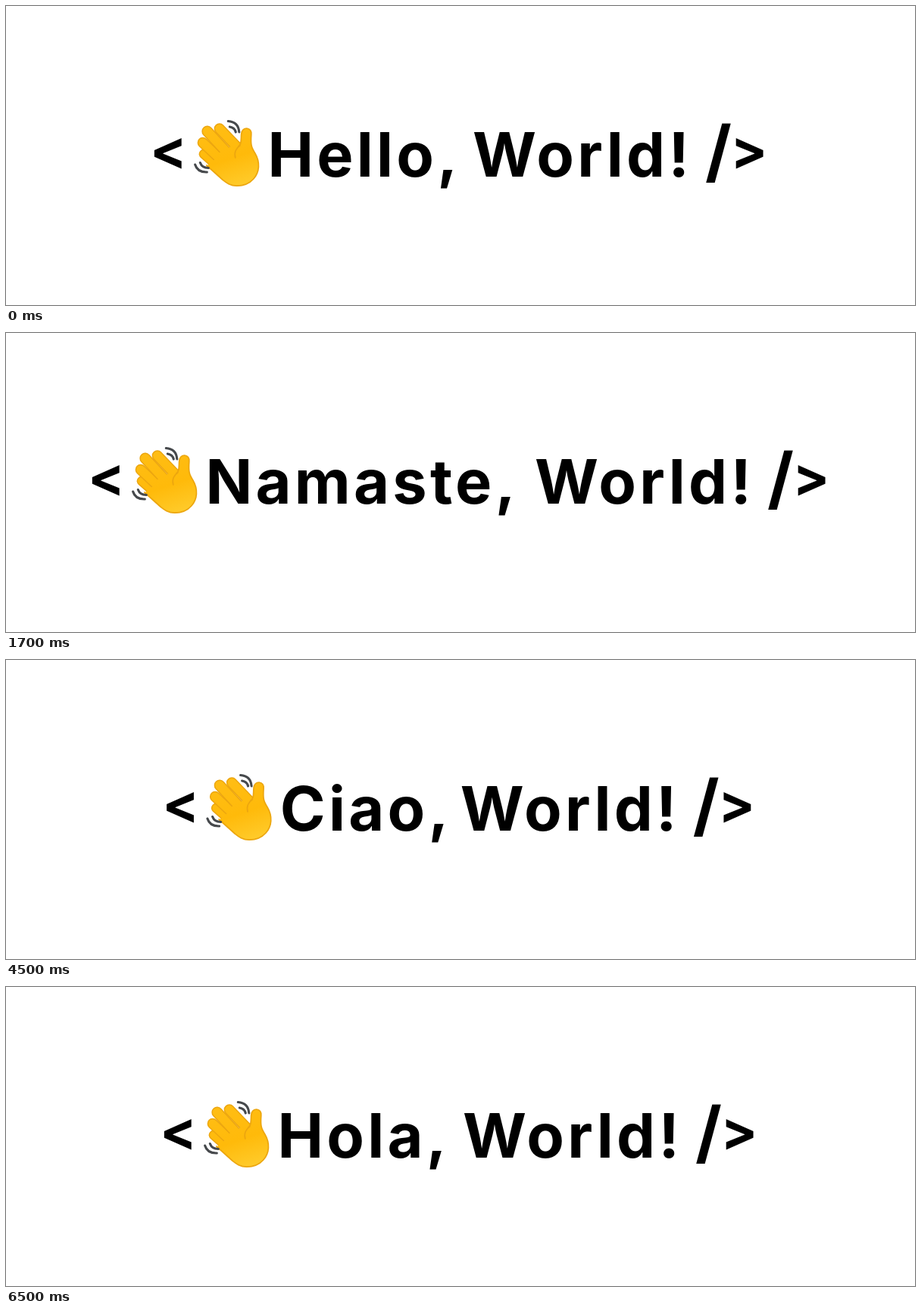
An HTML page that plays this animation: 1200x396 px, repeating every 8000 ms.

```html
<!DOCTYPE html>
<html lang="en">
<head>
<meta charset="utf-8">
<title>Hello, World!</title>
<style>
  html, body { margin: 0; width: 100%; height: 100%; overflow: hidden; background: #fff; }
  svg { display: block; width: 1200px; height: 396px; }
  text { font-family: Inter, "Open Sans", sans-serif; font-weight: 700; font-optical-sizing: none; fill: #000; }
  .word { font-size: 81px; letter-spacing: .053em; }
  .finger, .edge, .wave { fill: none; stroke-linecap: round; stroke-linejoin: round; }
  .edge { stroke: #eca60f; stroke-width: 1.7; }
  .wave { stroke: #46494c; stroke-width: 3.1; }
</style>
</head>
<body>
<svg id="stage" viewBox="0 0 1200 396">
  <defs>
    <linearGradient id="skin" gradientUnits="userSpaceOnUse" x1="30" y1="8" x2="58" y2="90">
      <stop offset="0" stop-color="#ffbd14"/>
      <stop offset=".55" stop-color="#ffba0a"/>
      <stop offset="1" stop-color="#ffcb2b"/>
    </linearGradient>
    <g id="hand">
      <g id="fingers"></g>
      <path fill="url(#skin)" d="M63 19Q64 12 70 12Q76.500 13 76 20C75 34 76 37 81 45C88 57 87 70 79 79C72 87 63 88.500 57 88.500C48 88.500 43 84 38 80L17 62L28 53L34 44L44 40L52 33L59 36C64 33 62 25 63 19Z"/>
      <path class="edge" d="M59 36C64 33 62 25 63 19Q64 12 70 12Q76.500 13 76 20C75 34 76 37 81 45C88 57 87 70 79 79C72 87 63 88.200 57 88.200C48 88.200 43 84 38 80L17 61"/>
      <path class="edge" d="M61 35C56 38 53 44 55 51"/>
      <path class="wave" d="M45.500 2.500Q59 3.500 60 17M47.500 10Q54 11 55.500 17M1.800 60Q5 70.500 17.500 70M8.500 57.500Q11 64.500 19.500 64.500"/>
    </g>
  </defs>
</svg>
<script>
const LOOP = 8000;
// greeting, start, end, left edge of the centred line
const scenes = [
  ["Hello,", 0, 500, 195],
  ["Namaste,", 500, 2500, 113],
  ["Bonjour,", 2500, 4500, 133.5],
  ["Ciao,", 4500, 6500, 211.3],
  ["Hola,", 6500, 8000, 208]
];
// tip x, tip y, base x, base y, width
const fingers = [
  [13, 46, 40, 70, 11],
  [12, 31, 46, 63, 13],
  [18, 16, 52, 53, 13.5],
  [34, 12.5, 66, 46, 13]
];

const pen = document.createElement("canvas").getContext("2d");

function add(parent, tag, attrs, text) {
  const el = document.createElementNS("http://www.w3.org/2000/svg", tag);
  for (const key in attrs) el.setAttribute(key, attrs[key]);
  if (text) el.textContent = text;
  parent.append(el);
  return el;
}

function ink(text, size) {
  pen.font = `700 ${size}px Inter, "Open Sans", sans-serif`;
  return pen.measureText(text);
}

// Puts a sign by the left and the vertical middle of its ink.
function sign(parent, text, left, middle, size) {
  const m = ink(text, size);
  add(parent, "text", {
    x: left + m.actualBoundingBoxLeft,
    y: middle + (m.actualBoundingBoxAscent - m.actualBoundingBoxDescent) / 2,
    "font-size": size
  }, text);
}

function word(parent, text, x) {
  add(parent, "text", { class: "word", x, y: 226 }, text);
}

const fingerBox = document.getElementById("fingers");
for (const [x1, y1, x2, y2, w] of fingers) {
  const d = `M${x1} ${y1}L${x2} ${y2}`;
  add(fingerBox, "path", { class: "finger", d, stroke: "#eca60f", "stroke-width": w + 1.4 });
  add(fingerBox, "path", { class: "finger", d, stroke: "url(#skin)", "stroke-width": w - 1.6 });
}

const stage = document.getElementById("stage");
for (const [greeting, start, end, left] of scenes) {
  const right = 1200 - left;
  const g = add(stage, "g", { opacity: 0 });
  sign(g, "<", left, 195.5, 72);
  add(g, "use", { href: "#hand", x: left + 52.8, y: 150 });
  word(g, greeting, left + 150.4);
  word(g, "World!", right - 388 + ink("W", 81).actualBoundingBoxLeft);
  sign(g, "/", right - 81, 194.5, 90);
  sign(g, ">", right - 41.5, 195.5, 72);
  g.animate([
    { opacity: 0, offset: 0, easing: "step-end" },
    { opacity: 1, offset: start / LOOP, easing: "step-end" },
    { opacity: end < LOOP ? 0 : 1, offset: end / LOOP, easing: "step-end" },
    { opacity: end < LOOP ? 0 : 1, offset: 1 }
  ], { duration: LOOP, iterations: Infinity });
}
</script>
</body>
</html>
```
